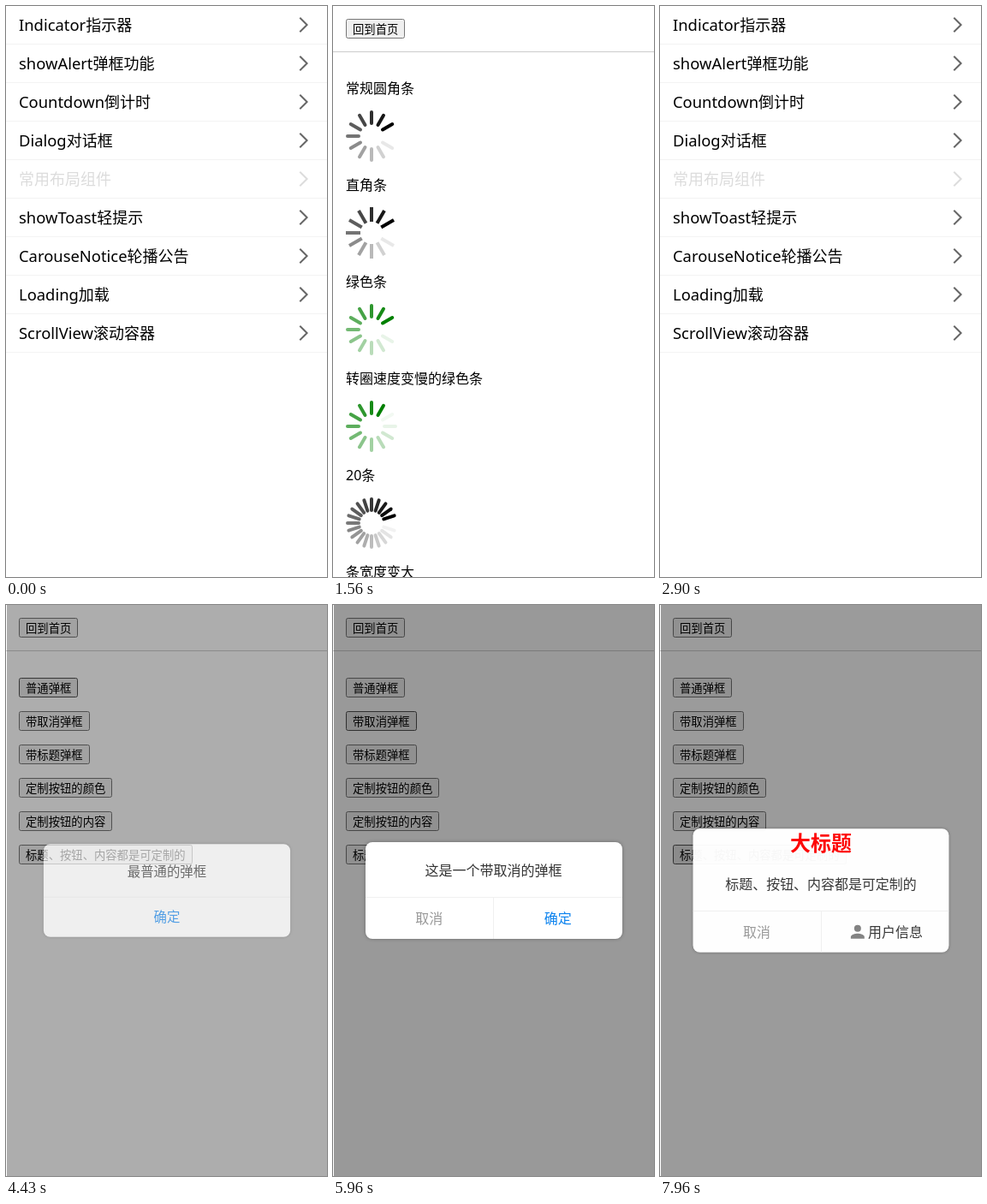
An HTML page that plays this animation: 375x667 px, repeating every 8 s.

```html
<!DOCTYPE html>
<html lang="zh-CN">
<head>
<meta charset="utf-8">
<style>
html, body { margin: 0; width: 100%; height: 100%; overflow: hidden; background: #fff; }
body { font: 16px "Noto Sans", "Noto Sans CJK SC", "Noto Sans CJK", sans-serif; color: #000; }
#stage { position: relative; width: 375px; height: 667px; overflow: hidden; white-space: nowrap; }
.page { position: absolute; inset: 0; }
.row { position: relative; box-sizing: border-box; height: 45px; padding-left: 15px;
  font-size: 18px; line-height: 44px; border-bottom: 1px solid #f3f3f3; color: #000; }
.row b { font-weight: 400; font-size: 18.4px; }
.row svg { position: absolute; left: 0; top: 0; fill: none; stroke: #666; stroke-width: 2; }
.row.off { color: #dcdcdc; }
.row.off svg { stroke: #dcdcdc; }
.btn { position: absolute; left: 15px; box-sizing: border-box; height: 23px; padding: 0 7px;
  font-size: 13.333px; line-height: 22px; background: #efefef; border: 1px solid #767676; border-radius: 2.5px; }
.btn.hover { background: #e5e5e5; border-color: #4f4f4f; }
.rule { position: absolute; top: 53px; left: 0; right: 0; height: 1px; background: #ccc; }
.label { position: absolute; left: 15px; line-height: 24px; }
.spin { position: absolute; left: 15px; width: 60px; height: 60px; }
.mask { position: absolute; inset: 0 0 0 1px; background: rgba(0,0,0,.4); }
.dialog { position: absolute; left: 36.5px; width: 300px; background: #fff; border-radius: 8px;
  overflow: hidden; text-align: center; color: #333; box-shadow: 0 0 4px rgba(0,0,0,.3); }
.title { height: 32px; line-height: 34px; font-size: 24px; font-weight: 700; color: red; }
.msg { height: 64px; line-height: 67px; }
.acts { display: flex; height: 48px; line-height: 50px; border-top: 1px solid #f0f0f0; }
.acts div { flex: 1; display: flex; justify-content: center; align-items: center; }
.acts div + div { border-left: 1px solid #f0f0f0; }
.acts .no { color: #999; }
.acts .yes { color: #0b82ee; }
.acts .user { color: #333; }
.acts svg { width: 24px; height: 24px; fill: #808080; }
.closing .acts div:last-child { background: #e5e5e2; }
</style>
</head>
<body>
<div id="stage">
  <div class="page" id="home"></div>
  <div class="page" id="spinners"></div>
  <div class="page" id="alerts"></div>
</div>
<script>
const LOOP = 8000, FRAME = 200 / 3, FADE = 200;
const $ = id => document.getElementById(id);
const stage = $('stage'), home = $('home'), spinners = $('spinners'), alerts = $('alerts');

function add(parent, cls, html, top) {
  const el = document.createElement('div');
  el.className = cls;
  el.innerHTML = html;
  if (top !== undefined) el.style.top = top + 'px';
  return parent.appendChild(el);
}

// Home list
const rows = ['Indicator|指示器', 'showAlert|弹框功能', 'Countdown|倒计时', 'Dialog|对话框', '|常用布局组件',
  'showToast|轻提示', 'CarouseNotice|轮播公告', 'Loading|加载', 'ScrollView|滚动容器'];
const chevron = '<svg width="375" height="44"><path d="M343.3 13.8 351.6 22 343.3 30.2"/></svg>';
for (const row of rows) {
  const [latin, han] = row.split('|');
  add(home, latin ? 'row' : 'row off', `<b>${latin}</b>${han}${chevron}`);
}

// Shared page header
for (const page of [spinners, alerts]) {
  add(page, 'btn', '回到首页', 15);
  add(page, 'rule', '');
}

// Spinners: head is the leading bar at the 1560 ms mark
const spins = [
  { text: '常规圆角条' },
  { text: '直角条', round: 0 },
  { text: '绿色条', color: 'green' },
  { text: '转圈速度变慢的绿色条', color: 'green', period: 1000, head: 1, min: .05 },
  { text: '20条', n: 20, head: 4 },
  { text: '条宽度变大', w: 8 }
].map((opts, i) => {
  const s = { n: 12, w: 4, round: 1, color: '#000', period: 500, head: 2, min: 0, ...opts };
  add(spinners, 'label', s.text, 84 + 113 * i);
  let bars = '';
  for (let k = 0; k < s.n; k++)
    bars += `<rect x="${-s.w / 2}" y="-30" width="${s.w}" height="17" rx="${s.round * s.w / 2}" transform="rotate(${360 / s.n * k})"/>`;
  const box = add(spinners, 'spin',
    `<svg width="60" height="60" viewBox="-30 -30 60 60" fill="${s.color}">${bars}</svg>`, 122 + 113 * i);
  s.bars = [...box.querySelectorAll('rect')];
  return s;
});

function drawSpin(s, t) {
  const head = s.head + Math.floor((t - 1560) / s.period * s.n + .3);
  s.bars.forEach((bar, k) => {
    const lag = (((head - k) % s.n) + s.n) % s.n;
    bar.setAttribute('opacity', Math.max(s.min, 1 - lag / (s.n - 1)));
  });
}

// Alert page and its dialogs
const buttons = ['普通弹框', '带取消弹框', '带标题弹框', '定制按钮的颜色', '定制按钮的内容', '标题、按钮、内容都是可定制的']
  .map((text, i) => add(alerts, 'btn', text, 85 + 39 * i));
const cancel = '<div class="no">取消</div>', ok = '<div class="yes">确定</div>';
const user = '<div class="user"><svg viewBox="0 0 24 24"><circle cx="12" cy="8" r="4"/>' +
  '<path d="M4 20v-2c0-2.7 5.3-4 8-4s8 1.3 8 4v2z"/></svg>用户信息</div>';
const dialogs = [
  { button: 0, open: 4333, close: 5167, msg: '最普通的弹框', acts: ok },
  { button: 1, open: 5733, close: 6967, msg: '这是一个带取消的弹框', acts: cancel + ok },
  { button: 5, open: 7800, close: 9000, title: '大标题', msg: '标题、按钮、内容都是可定制的', acts: cancel + user }
];
for (const d of dialogs) {
  const title = d.title ? `<div class="title">${d.title}</div>` : '';
  d.mask = add(stage, 'mask', '');
  d.el = add(d.mask, 'dialog', `${title}<div class="msg">${d.msg}</div><div class="acts">${d.acts}</div>`,
    d.title ? 261 : 277);
}

// cubic-bezier(.25, .1, .25, 1)
function ease(x) {
  if (x <= 0 || x >= 1) return x <= 0 ? 0 : 1;
  let lo = 0, hi = 1, s = .5;
  for (let i = 0; i < 24; i++) {
    s = (lo + hi) / 2;
    if (.75 * s - .75 * s * s + s ** 3 < x) lo = s; else hi = s;
  }
  return .3 * (1 - s) ** 2 * s + 3 * (1 - s) * s * s + s ** 3;
}
const ramp = (t, start, length) => ease((t - start) / length);
const show = (el, on) => { el.style.visibility = on ? 'visible' : 'hidden'; };

// Hold the picture at 15 steps a second, on a 10 ms clock
function snap(t) {
  const tick = Math.floor(t / 10) * 10 + 9.9;
  return (Math.floor((tick - 33.3) / FRAME) + .5) * FRAME;
}

function draw(now) {
  const t = snap(now % LOOP);
  const onSpin = t > 495 && t < 2895, onAlert = t > 3562;
  show(home, !onSpin && !onAlert);
  show(spinners, onSpin);
  show(alerts, onAlert);

  if (onSpin) {
    const scroll = 95 * (ramp(t, 1600, 400) - ramp(t, 2350, 400));
    spinners.style.transform = `translateY(${-scroll}px)`;
    for (const s of spins) drawSpin(s, t);
  }

  // Mask and dialog fade together, one inside the other
  for (const d of dialogs) {
    const p = ramp(t, d.open, FADE) - ramp(t, d.close, FADE);
    const on = p > .001, closing = t > d.close;
    show(d.mask, on);
    d.mask.style.opacity = d.el.style.opacity = p;
    d.el.style.transform = p === 1 ? 'none' : `scale(${.8 + .2 * p})`;
    d.el.classList.toggle('closing', closing);
    buttons[d.button].classList.toggle('hover', on && !closing);
  }
}

const start = performance.now();
function loop() {
  draw(performance.now() - start);
  requestAnimationFrame(loop);
}
loop();
</script>
</body>
</html>
```
